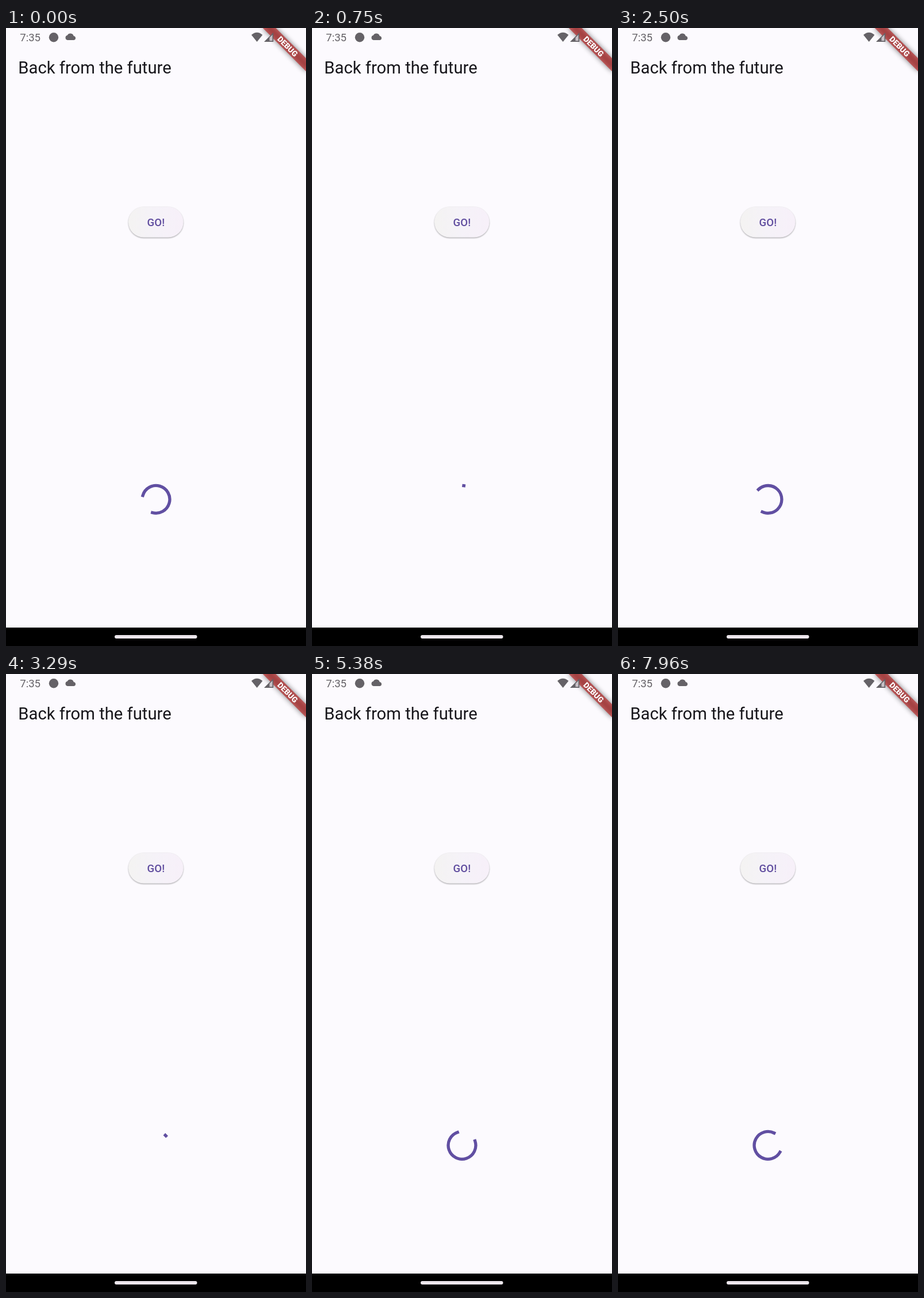
Write an HTML page that moves like this. It is 522 by 1073 pixels and loops after 8 s.

```html
<!DOCTYPE html>
<html lang="en">
<head>
<meta charset="utf-8">
<title>Back from the future</title>
<style>
  html, body { margin: 0; width: 100%; height: 100%; overflow: hidden; background: #fcfafe; }
  svg { display: block; font-family: Roboto, sans-serif; }
</style>
</head>
<body>
<svg width="522" height="1073" viewBox="0 0 522 1073">
  <defs>
    <linearGradient id="pill">
      <stop offset="0" stop-color="#f4f3f2"/>
      <stop offset=".5" stop-color="#f5f2f8"/>
      <stop offset="1" stop-color="#f7f0f9"/>
    </linearGradient>
    <filter id="soft" x="-30%" y="-30%" width="160%" height="160%"><feGaussianBlur stdDeviation="1.1"/></filter>
    <filter id="shade" x="-30%" y="-150%" width="160%" height="400%"><feGaussianBlur stdDeviation="5"/></filter>
  </defs>
  <rect width="522" height="1073" fill="#fcfafe"/>

  <text x="21.3" y="78.5" font-size="29.24" fill="#17161b">Back from the future</text>

  <!-- button -->
  <rect x="213" y="311.6" width="95.6" height="53.2" rx="26.6" opacity=".32" filter="url(#soft)"/>
  <rect x="213" y="310.4" width="95.6" height="53.2" rx="26.6" fill="url(#pill)"/>
  <text x="261" y="343.6" font-size="18.6" font-weight="500" letter-spacing=".13" text-anchor="middle" fill="#604d9f">GO!</text>

  <!-- spinner -->
  <circle id="arc" cx="261" cy="818.4" r="23.92" pathLength="360" fill="none"
    stroke="#614fa2" stroke-width="5.32" stroke-linecap="square"/>

  <!-- corner banner -->
  <g transform="translate(522 0) rotate(45)">
    <rect x="-53.2" y="37.2" width="106.4" height="16" opacity=".5" filter="url(#shade)"/>
    <rect x="-53.2" y="37.2" width="106.4" height="16" fill="#b71c1c" fill-opacity=".627"/>
    <text y="50" font-size="13.56" font-weight="900" text-anchor="middle" fill="#fff">DEBUG</text>
  </g>

  <!-- status bar -->
  <g fill="#656267">
    <text x="24.2" y="23" font-size="18.6">7:35</text>
    <circle cx="83" cy="16.2" r="8.2"/>
    <path d="M107 21a4.2 4.2 0 0 1-.4-8.2a6 6 0 0 1 11.2 1.1a3.6 3.6 0 0 1 .4 7.1z"/>
    <path d="M427 12Q436.700 3.300 446.400 12L436.700 24Z"/>
    <path d="M449 24L465.300 7.700V24Z"/>
    <path d="M458.500 16.800L463.500 11.800V22.300H458.500Z" fill="#c9c2c8"/>
  </g>

  <!-- navigation bar -->
  <rect y="1041" width="522" height="32"/>
  <rect x="189" y="1054" width="143.500" height="6" rx="3" fill="#ece6ec"/>
</svg>
<script>
  const LOOP = 8000, STEP = 1000 / 24;
  const PATH = 1333, PATH_START = 723;   // grow-and-shrink cycle, ms
  const TURN = 2245, TURN_START = 245;   // steady rotation, ms and degrees
  const arc = document.getElementById('arc');
  const clamp = v => Math.min(1, Math.max(0, v));

  // cubic-bezier(.4, 0, .2, 1)
  function ease(x) {
    let lo = 0, hi = 1;
    for (let i = 0; i < 24; i++) {
      const s = (lo + hi) / 2, r = 1 - s;
      if (1.2 * s * r * r + 0.6 * s * s * r + s * s * s < x) lo = s; else hi = s;
    }
    return lo * lo * (3 - 2 * lo);
  }

  function draw() {
    const t = Math.floor((performance.now() % LOOP + 5) / STEP) * STEP;
    const phase = ((t - PATH_START + PATH) % PATH) / PATH;
    const head = 270 * ease(clamp(phase * 2));
    const tail = 270 * ease(clamp(phase * 2 - 1));
    const start = TURN_START + 360 * t / TURN + 90 * phase + tail - 90;
    arc.setAttribute('transform', `rotate(${start} 261 818.4)`);
    arc.setAttribute('stroke-dasharray', `${Math.max(head - tail, 0.06)} 720`);
    requestAnimationFrame(draw);
  }
  draw();
</script>
</body>
</html>
```
